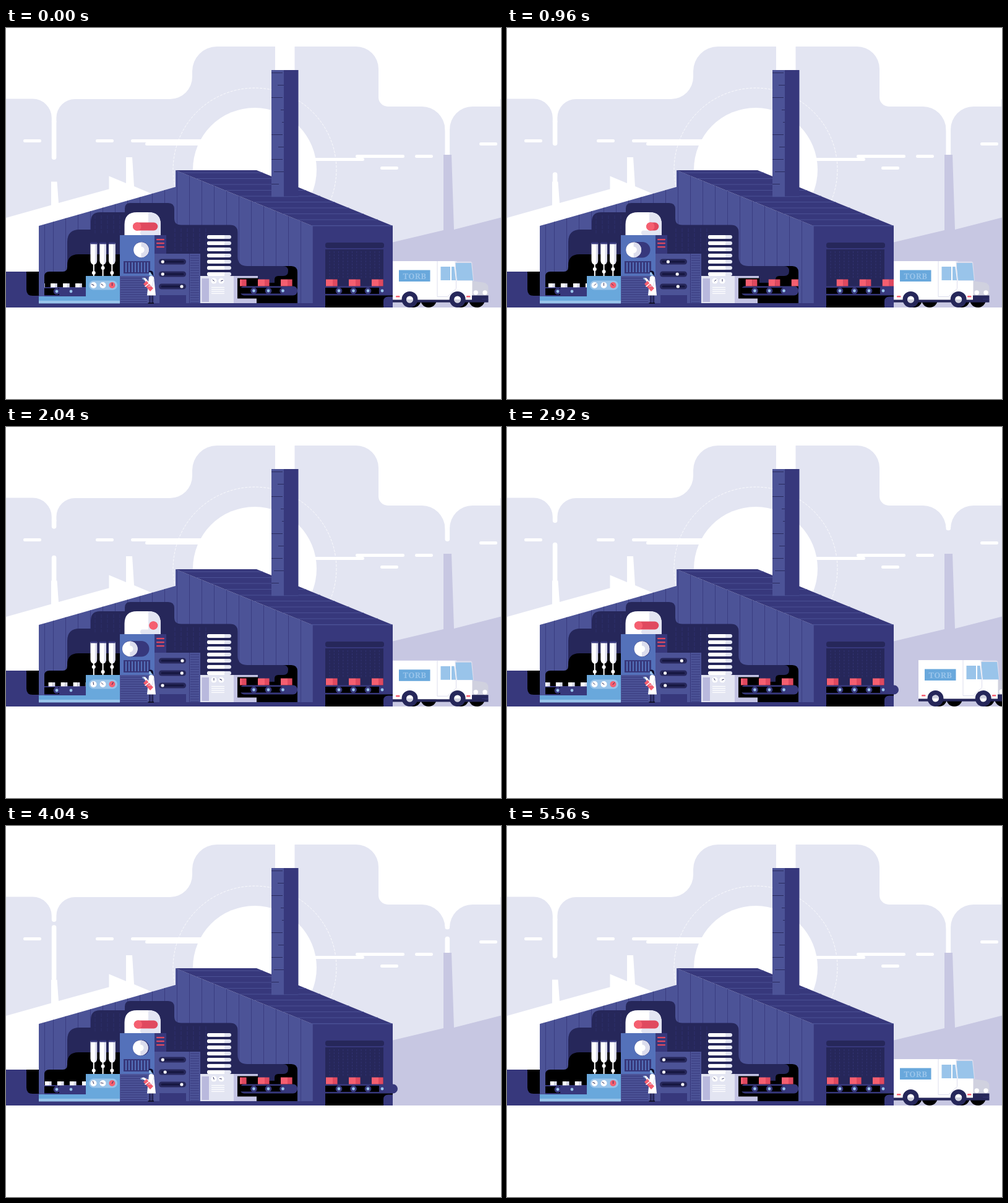
An HTML page for the animation above (5600 ms loop, 800x600 px).

```html
<!DOCTYPE html>
<html lang="en">
<head>
<meta charset="utf-8">
<title>Factory</title>
<style>
html, body { margin: 0; width: 100%; height: 100%; overflow: hidden; background: #fff; }
svg { display: block; width: 100vw; height: 100vh; }
text { font: 900 13px "Noto Serif", "DejaVu Serif", serif; letter-spacing: .4px; }
</style>
</head>
<body>
<svg id="stage" viewBox="0 0 800 600"></svg>
<script>
const LOOP = 5600;
const C = {
  sky: '#e3e5f2', hill: '#c7c7e2', wall: '#4c5397', navy: '#37387c', dark: '#26275a', black: '#000',
  blue: '#5471ba', azure: '#69a8dc', pale: '#99c4ea', white: '#fff', lilac: '#b9b9dd',
  red: '#f55f70', crimson: '#e0495f', grey: '#dcdded', hood: '#d0d1df'
};

// --- markup helpers ---
const rect = (x, y, x2, y2, fill, r = 0, more = '') =>
  `<rect x="${x}" y="${y}" width="${x2 - x}" height="${y2 - y}" rx="${r}" fill="${fill}" ${more}/>`;
const disc = (x, y, r, fill, more = '') => `<circle cx="${x}" cy="${y}" r="${r}" fill="${fill}" ${more}/>`;
const path = (d, fill, more = '') => `<path d="${d}" fill="${fill}" ${more}/>`;
const line = (d, stroke, w = 1, more = '') => path(d, 'none', `stroke="${stroke}" stroke-width="${w}" ${more}`);
const group = (id, body, more = '') => `<g id="${id}" ${more}>${body}</g>`;
const rep = (n, f) => Array.from({ length: n }, (_, i) => f(i)).join('');
const clip = (id, x, y, x2, y2) => `<clipPath id="${id}">${rect(x, y, x2, y2, '#000')}</clipPath>`;
const clipped = id => `clip-path="url(#${id})"`;

// --- parts ---
const SMOKE = [
  { id: 'smokeL', x: 73.8, start: 213, gap: 43 },
  { id: 'smokeR', x: 709.5, start: 233.4, gap: 41 }
];
const RISE = 132.7;

const smoke = s => `<g ${clipped(s.id + 'Clip')}>` + group(s.id,
  rep(3, k => rect(s.x, k * RISE - RISE + s.gap, s.x + 7.6, k * RISE, C.white, 3.8))) + '</g>';

const bars = [[28, 180, 57], [145, 180, 174], [202, 180, 325], [225, 185, 325], [490, 210, 579],
  [565, 205, 644], [661, 205, 690], [605, 224, 634], [765, 185, 794]];

const background = () =>
  path('M0 114.5H43A31 31 0 0 1 73.8 145V151.2a3.8 3.8 0 0 0 7.6 0V145A30 30 0 0 1 111.5 115H265A36 36 0 0 0 301 79V70' +
    'A40 40 0 0 1 341 30H435V90H466.500V30H566A36 36 0 0 1 602 66V112A15 15 0 0 0 617 127H672A37.500 37.500 0 0 1 709.500 164' +
    'a3.800 3.300 0 0 0 7.600 0A37 37 0 0 1 754 127H800V400H0Z', C.sky) +
  rect(799, 115, 800, 128, C.sky) +
  SMOKE.map(smoke).join('') +
  disc(402, 229, 100, C.white) +
  disc(402, 229, 132, 'none', 'stroke="#fff" stroke-width=".8" stroke-dasharray="4 2"') +
  bars.map(([x, y, x2]) => rect(x, y, x2, y + 5, C.white, 2.3)).join('') +
  path('M0 307L73 286.500V248.500H82.500L85 283L166.500 260.500V239.500L194 251V209H204L207 256L245 272V452H0Z', C.white) +
  path('M707 205H720L724 326L800 306.500V452H625V346.500L707 327Z', C.hill);

const wallLines = rep(21, i => {
  const x = 76.5 + i * 20;
  const y = x < 274 ? 320 - (x - 53) * 63 / 221 : 230 + (x - 274) * 90 / 221;
  return line(`M${x} ${y}V445`, C.navy, .8);
});
const roofLines = rep(10, i => {
  const y = 234 + i * 9.5, k = (y - 230) * 2.45;
  return line(`M${274 + k} ${y}H${405 + k}`, C.wall, .9);
});
const rungs = [[429, 72, 447], [439, 92, 449], [429, 112, 447], [444, 132, 449], [446, 152, 449],
  [429, 172, 447], [440, 192, 449], [429, 212, 447], [433, 232, 449], [429, 252, 441]];

const building = () =>
  rect(0, 394, 62, 452, C.navy) +
  path('M33 394H62V433H43Q33 433 33 423Z', C.black) +
  path('M53 320L274 257V230L495 320V452H53Z', C.wall) + wallLines + line('M62.500 318V434', C.navy, .8) +
  path('M274 230H405L625 320V452H495V320Z', C.navy) + roofLines +
  line('M495 320H625M495.500 320V445', C.wall, .8) +
  rect(429, 68, 449, 273, C.wall) + rect(449, 68, 472.5, 273, C.navy) +
  line('M429 272.700H472.500', C.wall, .8) +
  rungs.map(([x, y, x2]) => line(`M${x} ${y}.5H${x2}`, C.dark, .9)).join('') +
  rect(0, 445, 495, 452, C.navy);

const interior = () =>
  path('M62 434V402Q62 394 70 394H92Q99 394 99 386V366H184V434Z', C.black) +
  path('M380 385H461Q471 385 471 395V445H407V385Z', C.black) +
  path('M99 388V346Q99 326 119 326H137V313Q137 298 152 298H192V292Q192 283 201 283H262Q272 283 272 293V308Q272 318.500 283 318.500' +
    'H362Q374.500 318.500 374.500 331V370Q374.500 385 390 385H448Q456 385 456 393T448 401H440Q434 401 434 407V412H184V366H117Q99 366 99 384Z', C.dark) +
  rep(6, i => line(`M${273 + i * 10} 324V361`, C.navy, .6, 'stroke-dasharray="6 2"')) +
  rep(5, i => line(`M${144 + i * 10} 303V332`, C.navy, .5, 'stroke-dasharray="6 2"'));

const wheel = (x, y) => disc(x, y, 5.3, C.navy) + disc(x, y, 2.4, C.pale);
const needle = (id, x, y, len) =>
  group(id, line(`M0 1V${-len}`, C.dark, .9), `data-at="${x} ${y}"`);

const leftBelt = () =>
  rect(53, 434, 129, 441, C.azure) + rect(53, 441, 184, 445.5, C.pale) +
  rect(62, 419, 130, 421, C.navy) + rect(86, 420, 130, 433, C.navy) + rect(62, 432, 130, 434, C.navy) +
  wheel(82, 426) + wheel(105, 426) +
  `<g ${clipped('leftClip')}>` + group('jars',
    rep(5, i => rect(52 + i * 20, 413, 59 + i * 20, 419.5, C.white) + rect(59 + i * 20, 413, 62.7 + i * 20, 419.5, C.grey))) + '</g>';

const tube = (x, i) =>
  rect(x - 1, 380, x + 1, 402, C.white) +
  path(`M${x - 5.3} 348V376Q${x - 5} 381 ${x - 1.5} 382.500H${x + 1.5}Q${x + 5} 381 ${x + 5.3} 376V348Z`, C.white) +
  path(`M${x + 2} 348V382Q${x + 5} 381 ${x + 5.3} 376V348Z`, C.grey) +
  rect(x - 5.3, 346.5, x + 5.3, 349.5, C.navy) + disc(x, 396, 3, C.white, `id="ball${i}"`);

const filler = () =>
  [141.8, 156.6, 171.3].map(tube).join('') +
  rect(129, 401, 184, 441, C.azure) + rect(134, 408.5, 180, 423.5, C.pale, 7.5) +
  disc(141.5, 416, 5, C.white) + disc(156.5, 416, 5, C.white) + disc(171.5, 416, 5, C.red) +
  needle('n0', 141.5, 416, 3.8) + needle('n1', 156.5, 416, 3.8) + needle('n2', 171.5, 416, 3.8);

const press = () =>
  path('M191.500 335V318Q191.500 298 211.500 298H230Q250 298 250 318V335Z', C.white) +
  path('M230 298Q250 298 250 318V335H220.500Q217 335 217 331.300T220.500 327.500H230Z', C.sky) +
  rect(205, 314.5, 245.3, 327.5, C.crimson, 6.5, 'id="plug"') + disc(211.7, 321, 6.7, C.red, 'id="plugCap"') +
  rect(184, 335, 240, 402, C.blue) + rect(240, 335, 259, 365, C.navy) +
  [342, 348, 354].map(y => rect(243, y - 1, 256, y + 1.2, C.crimson, 1)).join('') +
  rect(206, 346, 231.5, 371.5, C.navy, 12.7, 'id="track"') +
  group('knob', disc(0, 0, 12.4, C.white) + path('M0 -12.400A12.400 12.400 0 0 1 0 12.400Z', C.grey) + disc(0, 0, 5.2, C.white)) +
  rect(190, 377, 233, 397, C.navy) + rep(8, i => rect(193 + i * 5, 379, 195 + i * 5, 395, C.blue)) +
  rect(184, 401, 240, 445, C.wall) + rep(11, i => line(`M185 ${404.5 + i * 3.8}H228`, C.navy, 1));

const sliders = () =>
  rect(240, 365, 314, 445, C.wall) + line('M296.500 365V445', C.navy) +
  rep(20, i => line(`M298 ${368 + i * 4}H312`, C.navy, 1)) +
  rep(3, i => rect(247, 373.5 + i * 20, 291, 382.5 + i * 20, C.dark, 4.5) +
    line(`M252 ${378 + i * 20}H286`, '#15163f', 3, 'stroke-linecap="round"') +
    disc(253, 378 + i * 20, 2.6, C.white, `id="slide${i}"`)) +
  rect(248, 432, 291, 445, C.navy);

const packer = () =>
  rep(7, i => {
    const y = 335 + i * 10;
    return rect(325, y, 364, y + 6, C.sky, 3) + path(`M353 ${y}H328a3 3 0 0 0 0 6H353Z`, C.white);
  }) +
  rect(314, 401, 368, 445, C.sky) + rect(316.5, 405, 328, 443, C.lilac) + rect(368, 401, 407, 445, '#c3c3e3') +
  disc(336, 409, 4.6, C.white) + disc(348, 409, 4.6, C.white) +
  needle('n3', 336, 409, 3) + needle('n4', 348, 409, 3) +
  rep(4, i => line(`M332 ${419.5 + i * 3.3}H353`, C.white, 1.2));

const parcel = x => rect(x, 406.5, x + 11, 417.5, C.red) + rect(x + 11, 406.5, x + 18.6, 417.5, C.crimson);

const midBelt = () =>
  rect(374, 404.5, 408, 437.5, C.black) + rect(405, 412, 436, 445, C.black) +
  rect(378, 417.5, 471, 432.5, C.navy, 7) + rect(374, 420, 448, 429.5, C.black) +
  [400.5, 424, 447.5].map(x => wheel(x, 425)).join('') +
  `<g ${clipped('midClip')}>` + group('parcelsA', rep(4, i => parcel(333 + i * 37))) + '</g>';

const dock = () =>
  rect(516, 347, 611, 356, C.dark, 4) + rect(516, 358, 610, 418, C.dark) +
  rep(12, i => line(`M${523 + i * 7.3} 361V405`, C.navy, .7, 'stroke-dasharray="3 2"')) +
  rect(516, 418, 610, 452, C.black) + rect(610, 432, 625, 452, C.black) +
  path('M610 452V442Q610 434.500 618 434.500H625V452Z', C.navy) +
  path('M516 417.500H625.500a7.400 7.400 0 0 1 0 15H516V430H603V420H516Z', C.navy) +
  [538, 561.5, 585, 608].map(x => wheel(x, 425)).join('') +
  `<g ${clipped('dockClip')}>` + group('parcelsB', rep(4, i => parcel(480 + i * 37))) + '</g>';

const worker = () =>
  rect(231, 431, 234, 445, C.dark) + rect(235, 431, 238.3, 445, C.dark) + line('M229.500 445H239', C.black, 1.2) +
  disc(234.3, 397.3, 3.3, C.pale) + path('M230.500 394Q234 391 237.500 394.500L238.500 401L235 398L234 395.500Z', '#0c0d2b') +
  path('M231 402.500Q235 399 239 403L242 432.500H228Z', C.white) +
  group('arm', path('M-7 -9L-3 -8.500L4 0L0 2Z', C.white) + path('M-7 -9L-9 -8.500L-5 -4Z', C.pale)) +
  path('M227 409L238 421L233 426L222 414Z', C.red) + line('M224.500 418.500L233 411.500', C.white, 1.6) +
  line('M239 406L236.500 417L230 417.500', C.grey, 1);

const tyre = (x, id) => disc(x, 439, 13, C.dark) +
  group(id, disc(0, 0, 5.5, C.white) + path('M-5.500 0A5.500 5.500 0 0 0 5.500 0Z', C.hood), `data-x="${x}"`);

const truck = () => group('truck',
  [658, 683, 735, 761].map(x => disc(x, 439, 13, C.black)).join('') +
  group('cab',
    path('M625 377H728L754 409V440H625Z', C.white) +
    path('M727 377.500H750Q753 377.500 753.300 380L756 409H729Z', C.grey) +
    path('M726 380H752L755 408.500H729Z', C.pale) +
    path('M753 409L771 411.500Q779.500 413 779.500 420V433H753Z', C.hood) + rect(727, 408.5, 753.5, 440, C.white) +
    rect(753, 432.5, 779.5, 440, C.dark) + line('M769 438.700H779', C.navy, .8) +
    disc(759.2, 428, 3.7, C.white) + disc(774, 428, 3.7, C.white) +
    line('M697 377V434.500H713.500L727.500 421.500V408L726 377', C.grey, 1) +
    rect(702.5, 386, 718, 408, C.pale) + path('M720 386H724.500L727 408H720Z', C.pale) +
    rect(635, 391.5, 685.5, 410, C.azure) +
    `<text x="660.500" y="405.500" text-anchor="middle" fill="${C.pale}">TORB</text>` +
    rect(630, 433, 636.5, 435.6, C.red, 1.2) + rect(744, 433, 750.500, 435.6, C.red, 1.2) +
    rect(625, 439.5, 779.5, 443.7, C.dark)) +
  tyre(652.5, 'hub0') + tyre(729.7, 'hub1'));

const stage = document.getElementById('stage');
stage.innerHTML = '<defs>' +
  clip('smokeLClip', 70, 150, 86, 256) + clip('smokeRClip', 705, 162, 720, 210) +
  clip('leftClip', 62, 410, 129, 421) + clip('midClip', 378, 404, 471, 419) +
  clip('dockClip', 516, 404, 632, 419) + clip('groundClip', 0, 0, 800, 452) + '</defs>' +
  `<g ${clipped('groundClip')}>` +
  [background, building, interior, leftBelt, filler, press, sliders, packer, midBelt, dock, worker, truck]
    .map(draw => draw()).join('') + '</g>';

// --- motion ---
const el = {};
stage.querySelectorAll('[id]').forEach(e => el[e.id] = e);
const set = (id, attrs) => { for (const k in attrs) el[id].setAttribute(k, attrs[k]); };
const move = (id, x, y = 0, turn = 0) => set(id, { transform: `translate(${x} ${y}) rotate(${turn})` });

const ease = (x, n) => x ** n / (x ** n + (1 - x) ** n);
const swing = (t, period, n) => ease(1 - Math.abs(1 - 2 * ((t % period) / period)), n);

const TIMES = [0, 960, 2040, 2920, 4040, 4640, LOOP];
const keyed = (t, values) => {
  const i = TIMES.findIndex(k => k > t) - 1;
  const p = (t - TIMES[i]) / (TIMES[i + 1] - TIMES[i]);
  return values[i] + (values[i + 1] - values[i]) * ease(p, 1.6);
};
const NEEDLES = [
  [-60, 45, -10, -45, -20, 0, -60],
  [-55, 0, -45, -55, -80, -45, -55],
  [0, -45, 30, 40, 30, -60, 0],
  [-45, 45, 0, -30, -20, 20, -45],
  [70, 0, -60, 70, -80, -40, 70]
];
const ARM = [0, 0, 0, 0, -24, 0, 0];

const truckX = t => {
  if (t < 2240) return 0;
  if (t < 3390) return 180 * ((t - 2240) / 1150) ** 2.87;
  if (t < 4100) return 200;
  return t < 5000 ? 180 * ((5000 - t) / 900) ** 2.87 : 0;
};

function render(t) {
  SMOKE.forEach(s => move(s.id, 0, s.start - .0237 * t));
  move('jars', (t * 20 / 350) % 20);

  const s = swing(t, 1400, 2.2);
  [0, 1, 2].forEach(i => set('ball' + i, { cy: i === 1 ? 388 + 8 * s : 396 - 8 * s }));
  set('plug', { x: 205 + 26.5 * s, width: 40.3 - 26.5 * s });
  set('plugCap', { cx: 211.7 + 26.5 * s });
  set('track', { x: 206 - 18.3 * s, width: 25.5 + 18.3 * s });
  move('knob', 218.5 - 18.3 * s, 358.8);

  set('slide0', { cx: 253.3 + 31.7 * swing(t + LOOP - 10, 800, 2.5) });
  set('slide1', { cx: 253.3 + 31.5 * (1 - Math.cos(t * Math.PI / 700)) / 2 });
  set('slide2', { cx: 284 - 31 * swing(t, 800, 2.8) });

  NEEDLES.forEach((values, i) => {
    const [x, y] = el['n' + i].dataset.at.split(' ');
    move('n' + i, x, y, keyed(t, values));
  });
  move('arm', 228.5, 413, keyed(t, ARM));

  const loading = t < 2100, beat = t % 700;
  const step = loading ? 37 * ease(Math.min(1, beat / 560), 2.2) : 0;
  move('parcelsA', step);
  move('parcelsB', step);

  const x = truckX(t);
  const dip = loading && beat > 450 ? 1.2 * Math.sin(Math.PI * (beat - 450) / 250) : 0;
  move('truck', x);
  move('cab', 0, dip);
  ['hub0', 'hub1'].forEach(id => move(id, el[id].dataset.x, 439, x / 13 * 180 / Math.PI));
}

const begin = performance.now();
function tick() {
  render((performance.now() - begin) % LOOP);
  requestAnimationFrame(tick);
}
tick();
</script>
</body>
</html>
```
